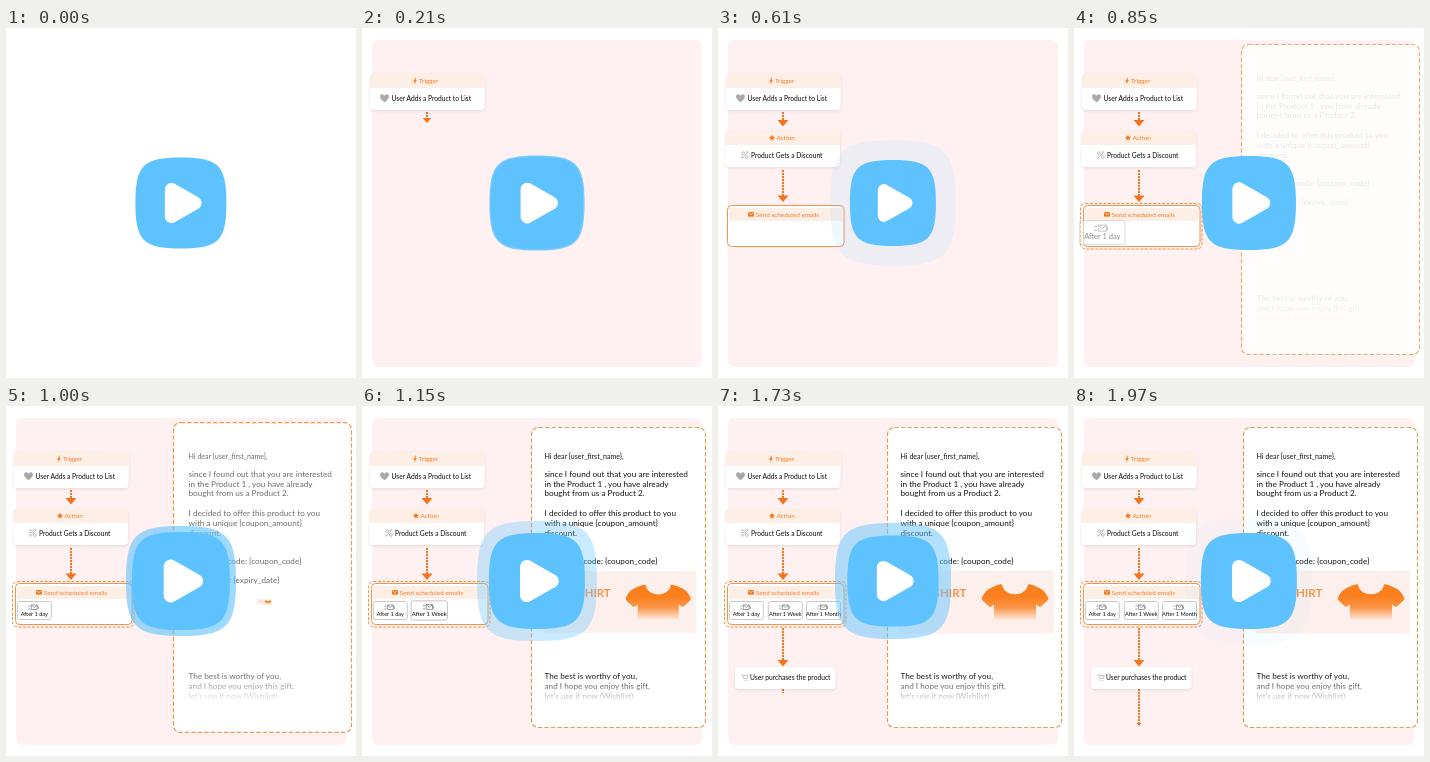
Write an HTML page that moves like this. It is 350 px wide and 350 px high and loops after 2 s.

```html
<!DOCTYPE html>
<html lang="en">
<head>
<meta charset="utf-8">
<title>Automation flow</title>
<style>
  html, body { margin: 0; width: 100%; height: 100%; overflow: hidden; background: #fff; }
  svg { display: block; width: 100vw; height: 100vh; }
  text { font-family: Lato, "Open Sans", sans-serif; fill: #0c0c0c; }
  .card { filter: drop-shadow(0 1px 1.5px #0000001a); }
  .label { font-size: 6.4px; fill: #f47a22; }
  .body { font-size: 6.7px; }
  .mail { font-size: 8.2px; fill: #141414; }
  .tiny { font-size: 5.6px; text-anchor: middle; }
  .end { text-anchor: end; }
</style>
</head>
<body>
<svg id="stage" viewBox="0 0 350 350">
  <defs>
    <linearGradient id="cloth" x2="0" y2="1">
      <stop offset=".3" stop-color="#fb7f1c"/>
      <stop offset=".6" stop-color="#fb9548"/>
      <stop offset=".95" stop-color="#fdf0ec"/>
    </linearGradient>
    <linearGradient id="veil" x2="0" y2="1">
      <stop offset="0" stop-color="#fff" stop-opacity="0"/>
      <stop offset="1" stop-color="#fff"/>
    </linearGradient>
  </defs>

  <rect id="ground" x="10" y="12" width="330" height="327" rx="6" fill="#fff1f1"/>
  <g id="arrows"></g>

  <g id="trigger">
    <rect class="card" x="8" y="46" width="114.5" height="36" rx="4" fill="#fff"/>
    <path d="M8 60V49q0-3 3-3h108.500q3 0 3 3v11z" fill="#fdeee6"/>
    <path d="M53.600 49.500 51 53.400h1.700l-.6 3 2.900-4.100h-1.800l1-2.800z" fill="#f47a22"/>
    <text class="label" x="57" y="55.200">Trigger</text>
    <path d="M22.500 74.200c-8-5-3.500-10.500 0-6.500 3.500-4 8 1.500 0 6.500z" fill="#aaa"/>
    <text class="body" x="29.500" y="73">User Adds a Product to List</text>
  </g>

  <g id="action">
    <rect class="card" x="7.500" y="103" width="114.500" height="36" rx="4" fill="#fff"/>
    <path d="M7.500 117v-11q0-3 3-3H119q3 0 3 3v11z" fill="#fdeee6"/>
    <path d="M54 106.700l.9 1.900 2.100.3-1.500 1.500.4 2.100-1.900-1-1.900 1 .4-2.100-1.500-1.500 2.100-.3z" fill="#f47a22"/>
    <text class="label" x="58.500" y="112.200">Action</text>
    <g fill="none" stroke="#b0b0b0" stroke-width=".8">
      <circle cx="25" cy="125.200" r="1.400"/><circle cx="28.800" cy="129" r="1.400"/>
      <path d="M24 130.500l6-7M27.500 124h2.500M24 128v2.500"/>
    </g>
    <text class="body" x="33" y="129.800">Product Gets a Discount</text>
  </g>

  <g id="schedule">
    <rect id="selection" x="6.500" y="175.500" width="121.500" height="45.500" rx="5" fill="none" stroke="#e98a35" stroke-width=".9" stroke-dasharray="3 1.500"/>
    <rect x="9.500" y="177.500" width="116.500" height="41" rx="4" fill="#fff" stroke="#f08a3a" stroke-width=".9"/>
    <rect x="11" y="180" width="113.500" height="13" fill="#fdeee6"/>
    <path d="M30 184h6v4.600h-6z" fill="#f47a22"/>
    <path d="M30.300 184.600l2.700 2 2.700-2" fill="none" stroke="#fdeee6" stroke-width=".6"/>
    <text class="label" x="37.800" y="188.500">Send scheduled emails</text>
  </g>
  <g id="delays"></g>

  <g id="purchase">
    <rect class="card" x="17" y="261" width="100.500" height="22" rx="4" fill="#fff"/>
    <path d="M23.500 268.800h1.300l1 3.700h3.400l1-3h-5" fill="none" stroke="#b8b8b8" stroke-width=".8"/>
    <circle cx="26.300" cy="274.300" r=".6" fill="#b8b8b8"/><circle cx="28.800" cy="274.300" r=".6" fill="#b8b8b8"/>
    <text class="body" x="32" y="274">User purchases the product</text>
  </g>

  <g id="letter">
    <rect id="frame" rx="7" fill="#fff" stroke-width="1.200" stroke-dasharray="4.500 2"/>
    <g id="copy"></g>
    <rect x="176" y="270" width="160" height="27" fill="url(#veil)"/>
    <g id="banner">
      <rect x="181" y="164.500" width="155" height="63" fill="#fdf0ec"/>
      <text class="end" x="248.500" y="191.300" font-size="11.600" font-weight="700" style="fill:#f6954a">T-SHIRT</text>
      <path d="M284 178.500c2 13 24 13 26 0q2-1 9 2.500 7 2 11 10.500 1 2-1 3.500l-6 5.500q-2 1-5-2v18.500h-42v-18.500q-3 3-5 2l-6-5.500q-2-1.500-1-3.500 4-8.500 11-10.500 7-3.500 9-2.500z" fill="url(#cloth)"/>
    </g>
  </g>

  <path id="halo" fill="#5ec2ff"/>
  <g id="button">
    <path id="face" fill="#5ec2ff"/>
    <path d="M-9.500-13.500 14.200 0-9.500 13.500z" fill="#fff" stroke="#fff" stroke-width="13" stroke-linejoin="round"/>
  </g>
</svg>
<script>
  const LOOP = 2000, PULSE = LOOP / 3;
  const $ = id => document.getElementById(id);
  const clamp = v => Math.max(0, Math.min(1, v));
  const ramp = (t, a, b) => clamp((t - a) / (b - a));
  const easeOut = v => 1 - (1 - v) ** 3;

  function add(parent, tag, attrs, text) {
    const node = document.createElementNS('http://www.w3.org/2000/svg', tag);
    set(node, attrs);
    if (text) node.textContent = text;
    return parent.appendChild(node);
  }

  function set(node, attrs) {
    for (const key in attrs) node.setAttribute(key, attrs[key]);
  }

  // Piecewise smooth interpolation through [position, value] pairs
  function track(keys, x) {
    const i = keys.findIndex(key => key[0] >= x);
    if (i < 0) return keys[keys.length - 1][1];
    if (i === 0) return keys[0][1];
    const [x0, v0] = keys[i - 1], [x1, v1] = keys[i];
    const k = (x - x0) / (x1 - x0);
    return v0 + (v1 - v0) * k * k * (3 - 2 * k);
  }

  const scaleAt = (x, y, s) => `translate(${x} ${y}) scale(${s}) translate(${-x} ${-y})`;

  function pop(node, t, start, end, x, y, from = 0.7) {
    const k = easeOut(ramp(t, start, end));
    set(node, { opacity: Math.min(1, k * 1.4), transform: scaleAt(x, y, from + (1 - from) * k) });
  }

  function squircle(r) {
    const k = r * 0.83;
    return `M0 ${-r}C${k} ${-r} ${r} ${-k} ${r} 0S${k} ${r} 0 ${r}S${-r} ${k} ${-r} 0S${-k} ${-r} 0 ${-r}Z`;
  }

  const arrows = [
    { top: 84, tip: 98.5, start: 150, end: 230, head: 1 },
    { top: 142, tip: 174, start: 310, end: 455, head: 1 },
    { top: 222, tip: 260.5, start: 1270, end: 1390, head: 1 },
    { top: 283, tip: 320, start: 1700, end: 1970, head: 0.45 }
  ];
  for (const arrow of arrows) {
    arrow.group = add($('arrows'), 'g', {});
    arrow.line = add(arrow.group, 'path', { stroke: '#f4731f', 'stroke-width': 2, 'stroke-dasharray': '2 1' });
    arrow.point = add(arrow.group, 'path', { d: 'M-5.500 -6.500h11L0 0z', fill: '#f4731f' });
  }

  const delays = [
    { x: 28.3, unit: 'day', start: 830 },
    { x: 67.3, unit: 'Week', start: 1070 },
    { x: 105.5, unit: 'Month', start: 1220 }
  ];
  for (const delay of delays) {
    const group = delay.group = add($('delays'), 'g', {}), x = delay.x;
    add(group, 'rect', { x: x - 17, y: 195.5, width: 34, height: 18, rx: 2, fill: '#fff', stroke: '#bbb', 'stroke-width': 0.8 });
    add(group, 'path', { d: `M${x - 3} 199h6v4.500h-6zl3 2.500 3-2.500M${x - 6} 200h2M${x - 6} 203h2M${x + 4} 200v3`, fill: 'none', stroke: '#777', 'stroke-width': 0.7 });
    add(group, 'text', { class: 'tiny', x, y: 209.5 }, `After 1 ${delay.unit}`);
  }

  const copy = $('copy');
  add(copy, 'text', { class: 'mail', x: 182.5, y: 53, style: 'font-size:7.1px' }, 'Hi dear {user_first_name},');
  [
    [71, 'since I found out that you are interested'],
    [80.5, 'in the Product 1 , you have already'],
    [90, 'bought from us a Product 2.'],
    [110, 'I decided to offer this product to you'],
    [120, 'with a unique {coupon_amount}'],
    [130, 'discount.'],
    [273, 'The best is worthy of you,'],
    [283, 'and I hope you enjoy this gift,'],
    [293, "let's use it now (Wishlist)"]
  ].forEach(([y, line]) => add(copy, 'text', { class: 'mail', x: 182.5, y }, line));
  add(copy, 'text', { class: 'mail end', x: 295.5, y: 157.5 }, 'Coupon code: {coupon_code}');
  add(copy, 'text', { class: 'mail end', x: 273.5, y: 177 }, 'Expiry: {expiry_date}');

  const buttonSize = [[0, 91], [390, 94], [610, 86], [1000, 98], [1150, 96], [1480, 94], [1780, 91], [1970, 96]];
  const haloSize = [[0, 84], [0.25, 92], [0.5, 110], [0.585, 116], [0.725, 120], [1, 127]];
  set($('face'), { d: squircle(45.5) });

  function drawArrow(arrow, t) {
    const k = ramp(t, arrow.start, arrow.end);
    const tip = arrow.top + (arrow.tip - arrow.top) * k;
    const size = k * arrow.head;
    set(arrow.group, { opacity: k > 0 ? 1 : 0 });
    set(arrow.line, { d: `M65 ${arrow.top}V${Math.max(arrow.top, tip - 5 * size)}` });
    set(arrow.point, { transform: `translate(65 ${tip}) scale(${size})` });
  }

  function drawLetter(t) {
    const grow = 1 - ramp(t, 1000, 1130);
    set($('letter'), { opacity: ramp(t, 720, 880) });
    set($('frame'), {
      x: 169.5 - 2 * grow, y: 21.5 - 5 * grow,
      width: 174 + 4 * grow, height: 300 + 10 * grow,
      stroke: grow > 0.5 ? '#f39a50' : '#d9a35a'
    });
    set(copy, { opacity: track([[800, 0], [1000, 0.62], [1130, 1]], t) });
    const size = track([[980, 0], [1000, 0.1], [1150, 0.98], [1200, 1]], t);
    set($('banner'), { transform: scaleAt(258, 196, size) });
  }

  function drawButton(t) {
    const phase = (t % PULSE) / PULSE;
    set($('halo'), {
      d: squircle(track(haloSize, phase) / 2),
      opacity: Math.min(0.8, 1.2 * (1 - phase)),
      transform: 'translate(175 175)'
    });
    set($('button'), { transform: `translate(174.9 175) scale(${track(buttonSize, t) / 91})` });
  }

  function draw(t) {
    set($('ground'), { opacity: ramp(t, 15, 100) });
    pop($('trigger'), t, 40, 150, 65, 64);
    pop($('action'), t, 220, 330, 65, 121);
    pop($('schedule'), t, 470, 590, 68, 198);
    pop($('purchase'), t, 1370, 1470, 67, 272);
    set($('selection'), { opacity: ramp(t, 640, 760) });
    arrows.forEach(arrow => drawArrow(arrow, t));
    delays.forEach(d => pop(d.group, t, d.start, d.start + 170, d.x, 204.5, 1.5));
    drawLetter(t);
    drawButton(t);
  }

  const begin = performance.now();
  function tick() {
    draw((performance.now() - begin) % LOOP);
    requestAnimationFrame(tick);
  }
  draw(0);
  requestAnimationFrame(tick);
</script>
</body>
</html>
```
